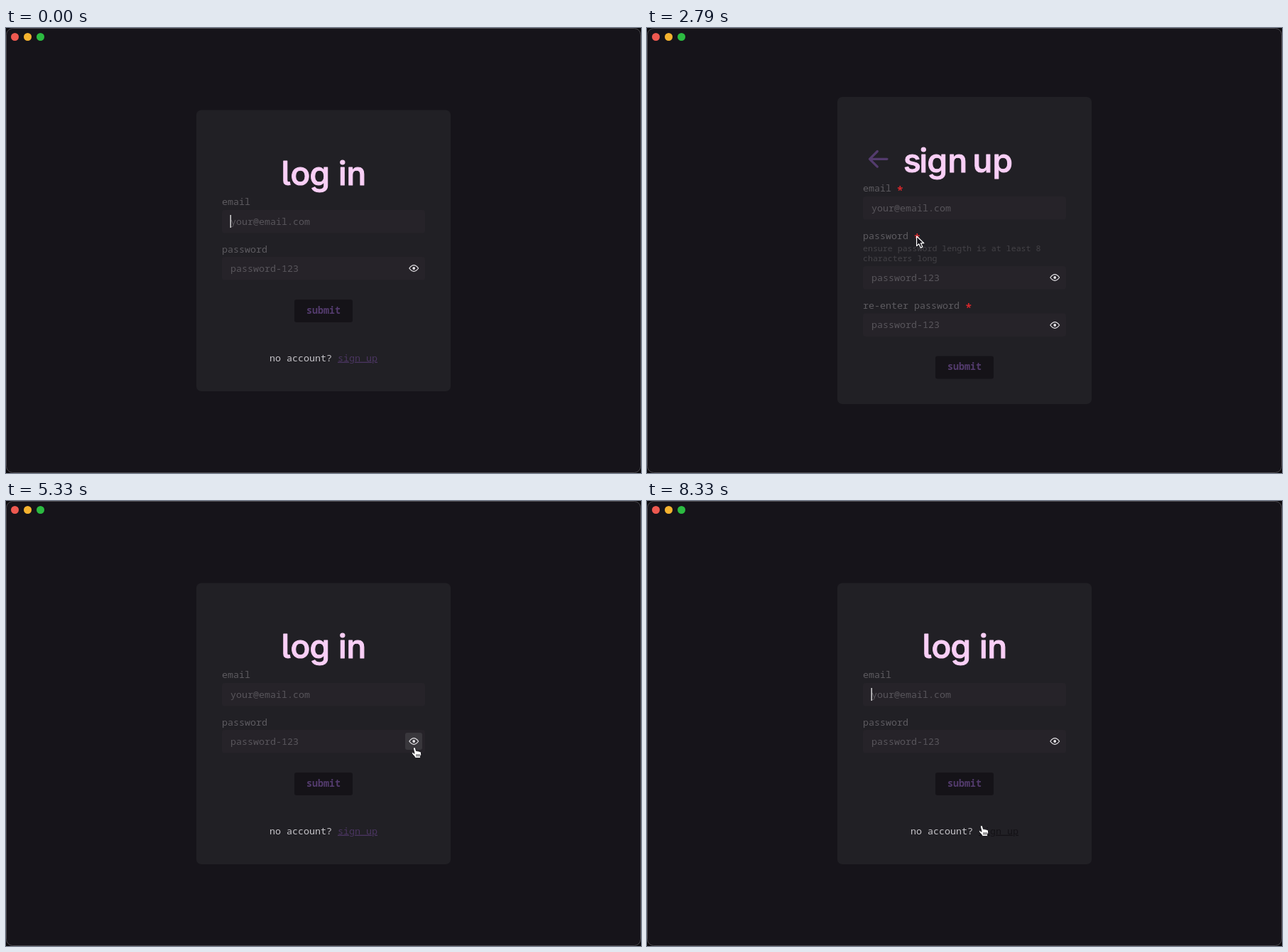
Animation of 894 by 626 pixels, one loop 8370 ms. Source, as an HTML page:

```html
<!DOCTYPE html>
<html lang="en">
<head>
<meta charset="utf-8">
<title>log in</title>
<style>
  html, body { margin: 0; width: 100%; height: 100%; overflow: hidden; background: #0b0a0d; }
  svg { display: block; width: 894px; height: 626px; }
  text { font: 400 13.33px "Noto Sans Mono", "DejaVu Sans Mono", monospace; white-space: pre; }
  .title {
    font: 500 46px Inter, sans-serif; font-feature-settings: "cv05";
    fill: #f9cff6; stroke: #f9cff6; stroke-width: 1.1; stroke-linejoin: round;
  }
  .label { font-weight: 500; fill: #5d5b60; }
  .star { font-weight: 700; font-size: 16px; fill: #d8282c; }
  .ghost { fill: #58555b; }
  .hint { font-size: 11.6px; fill: #444247; }
  .field { fill: #262329; }
  .ask { fill: #c6c4c9; }
  .link { fill: #4a3560; text-decoration: underline; }
  .link.on { fill: #131116; }
  .send rect { fill: #151318; }
  .send text { font-weight: 600; fill: #533b6d; }
  .send.on rect { fill: #533b6d; }
  .send.on text { fill: #f9cff6; }
  .eye rect { fill: none; }
  .eye.on rect { fill: #39373c; }
  .eye path { fill: none; stroke: #e6e4e8; stroke-width: 1.2; }
  .eye circle { fill: #e6e4e8; }
</style>
</head>
<body>
<svg id="stage" viewBox="0 0 894 626">
  <rect x=".5" y=".5" width="893" height="625" rx="9" fill="#16141a" stroke="#4b494e"/>
  <circle cx="12.5" cy="12.5" r="5.5" fill="#ee5950"/>
  <circle cx="30.5" cy="12.5" r="5.5" fill="#f5b32f"/>
  <circle cx="48.5" cy="12.5" r="5.5" fill="#2cbb41"/>
  <g id="login"></g>
  <g id="signup"></g>
  <g id="cursor">
    <path id="arrow" d="M.6 .8V14.6L3.8 11.7 6.2 17.1 8.9 15.9 6.5 10.7H10.8Z" fill="#17151b" stroke="#fff" stroke-width="1.2" stroke-linejoin="round"/>
    <g id="beam" fill="none" stroke-linecap="round">
      <path d="M-3.5 -7Q0 -7 0 -4.5 0 -7 3.5 -7M0 -5V5M-3.5 7Q0 7 0 4.5 0 7 3.5 7M-1.5 2H1.5" stroke="#fff" stroke-width="3"/>
      <path d="M-3.5 -7Q0 -7 0 -4.5 0 -7 3.5 -7M0 -5V5M-3.5 7Q0 7 0 4.5 0 7 3.5 7M-1.5 2H1.5" stroke="#17151b" stroke-width="1"/>
    </g>
    <g id="hand" stroke="#17151b" stroke-linejoin="round" stroke-linecap="round">
      <path d="M-1.6 .8Q-1.3 -1 .2 -.6 1.2 -.3 1.6 1.2L2.5 4.6Q3.8 3.9 4.8 5 6.2 4.3 7.1 5.5 9 5 9.5 7 10.1 9.6 8.6 11.9V14.6H1.4Q.6 12.6 -1.8 10.3 -4.6 7.6 -3.6 6.8 -2.5 6 -.2 8Z" fill="#fff" stroke-width="1"/>
      <path d="M3 9.5V12.2M5 9.5V12.2M7 9.5V12.2" fill="none" stroke-width=".9"/>
    </g>
  </g>
</svg>
<script>
const LOOP = 8370, TO_SIGNUP = 2120, TO_LOGIN = 4560, REFOCUS = 7100;
const $ = id => document.getElementById(id);

const text = (cls, x, y, s) => `<text class="${cls}" x="${x}" y="${y}">${s}</text>`;
const rect = (cls, x, y, w, h, r) =>
  `<rect class="${cls}" x="${x}" y="${y}" width="${w}" height="${h}" rx="${r}"/>`;
const card = (y, h) => `<rect x="268" y="${y}" width="358" height="${h}" rx="7" fill="#212025"/>`;
const label = (y, s) => text('label', 304, y, s);
const star = (x, y) => text('star', x, y, '*');
const hit = (x, y, w, h) => `data-hit="${x} ${y} ${w} ${h}"`;

const field = (y, s) =>
  `<g class="input" ${hit(304, y, 286, 44)}>${rect('field', 304, y, 286, 32.5, 4)}</g>` +
  text('ghost', 316, y + 20.5, s);

const eye = y =>
  `<g class="eye" ${hit(562, y - 12, 24, 24)}>${rect('', 562, y - 12, 24, 24, 3)}` +
  `<path d="M567.8 ${y}Q574.2 ${y - 8.6} 580.6 ${y}Q574.2 ${y + 8.6} 567.8 ${y}Z"/>` +
  `<circle cx="574.2" cy="${y}" r="1.9"/></g>`;

const submit = y =>
  `<g class="send" ${hit(406, y, 82, 32)}>${rect('', 406, y, 82, 32, 3)}` +
  text('', 423, y + 19.8, 'submit') + '</g>';

$('login').innerHTML =
  card(115.5, 395.5) +
  text('title', '387.5 400.5 427.5 455 468 479.5', 221.3, 'log in') +
  label(248.5, 'email') + field(256, 'your@email.com') +
  '<path id="caret" d="M316.2 263V281" stroke="#fff" stroke-width="1.2"/>' +
  label(315.5, 'password') + field(322, 'password-123') + eye(338) +
  submit(382) +
  text('ask', 371, 468.7, 'no account?') +
  `<g ${hit(467, 455, 56, 18)}>${text('link', 467, 468.7, 'sign up')}</g>`;

$('signup').innerHTML =
  card(97, 432) +
  `<g ${hit(310, 170, 31, 28)}><path d="M338 184.3H313.5M324.3 173.5 313.5 184.3 324.3 195.1" fill="none"
    stroke="#533b6d" stroke-width="3.3" stroke-linecap="round" stroke-linejoin="round"/></g>` +
  text('title', '361 383.5 394.5 423.5 450 458.5 486.5', 202.8, 'sign up') +
  label(230, 'email') + star(351.5, 233.5) + field(237, 'your@email.com') +
  label(297, 'password') + star(375.5, 300.5) +
  text('hint', 304, 314, 'ensure password length is at least 8') +
  text('hint', 304, 327.5, 'characters long') +
  field(335, 'password-123') + eye(351) +
  label(395.3, 're-enter password') + star(448, 398.8) +
  field(401.5, 'password-123') + eye(418) +
  submit(461.5);

// Pointer path: time, x, y
const path = [
  [80, 816, 330], [450, 600, 395], [880, 482, 408], [1150, 492, 460],
  [1400, 490, 511], [1580, 479.5, 496], [1790, 486, 488], [2000, 494, 463],
  [2200, 490, 458], [2790, 379, 292], [3100, 390, 350], [3380, 446, 474],
  [3560, 450, 478], [3920, 417, 377], [4330, 335, 200], [4450, 326, 185],
  [4600, 326, 185], [5210, 570, 340], [5330, 575, 347], [5630, 575, 347],
  [6100, 545, 368], [6500, 530, 380], [6710, 476, 401], [7000, 455, 402],
  [7300, 452, 400], [7800, 492, 440], [8210, 471, 457], [8370, 471, 457]
];

const slope = (i, k) => (path[i + 1][k] - path[i][k]) / (path[i + 1][0] - path[i][0]);

// Harmonic mean of the neighbouring slopes: no overshoot at turns and stops
function tangent(i, k) {
  if (i === 0 || i === path.length - 1) return 0;
  const a = slope(i - 1, k), b = slope(i, k);
  return a * b > 0 ? 2 * a * b / (a + b) : 0;
}

function pointer(t) {
  let i = 0;
  while (i < path.length - 2 && t >= path[i + 1][0]) i++;
  const a = path[i], b = path[i + 1], d = b[0] - a[0], u = Math.max(0, (t - a[0]) / d);
  return [1, 2].map(k => {
    const e = u * u * (3 - 2 * u);
    return a[k] + (b[k] - a[k]) * e +
      d * (u * (1 - u) ** 2 * tangent(i, k) - u * u * (1 - u) * tangent(i + 1, k));
  });
}

const targets = ['login', 'signup'].map(id =>
  [...$(id).querySelectorAll('[data-hit]')].map(el => {
    const [x, y, w, h] = el.dataset.hit.split(' ').map(Number);
    return { el, x, y, w, h, input: el.classList.contains('input') };
  }));

const show = (el, on) => el.setAttribute('visibility', on ? 'visible' : 'hidden');

function draw(t) {
  const page = t >= TO_SIGNUP && t < TO_LOGIN ? 1 : 0;
  const live = t >= 80;
  const [px, py] = pointer(t);
  let kind = 'arrow';
  $('login').style.display = page ? 'none' : '';
  $('signup').style.display = page ? '' : 'none';
  for (const { el, x, y, w, h, input } of targets[page]) {
    const over = live && px >= x && px <= x + w && py >= y && py <= y + h;
    if (over) kind = input ? 'beam' : 'hand';
    if (!input) {
      el.classList.toggle('on', over);
      const link = el.querySelector('.link');
      if (link) link.classList.toggle('on', over);
    }
  }
  show($('caret'), t < TO_SIGNUP || t >= REFOCUS);
  for (const id of ['arrow', 'beam', 'hand']) show($(id), live && id === kind);
  $('cursor').setAttribute('transform', `translate(${px.toFixed(2)} ${py.toFixed(2)})`);
}

const start = performance.now();
function tick() {
  draw((performance.now() - start) % LOOP);
  requestAnimationFrame(tick);
}
draw(0);
requestAnimationFrame(tick);
</script>
</body>
</html>
```
